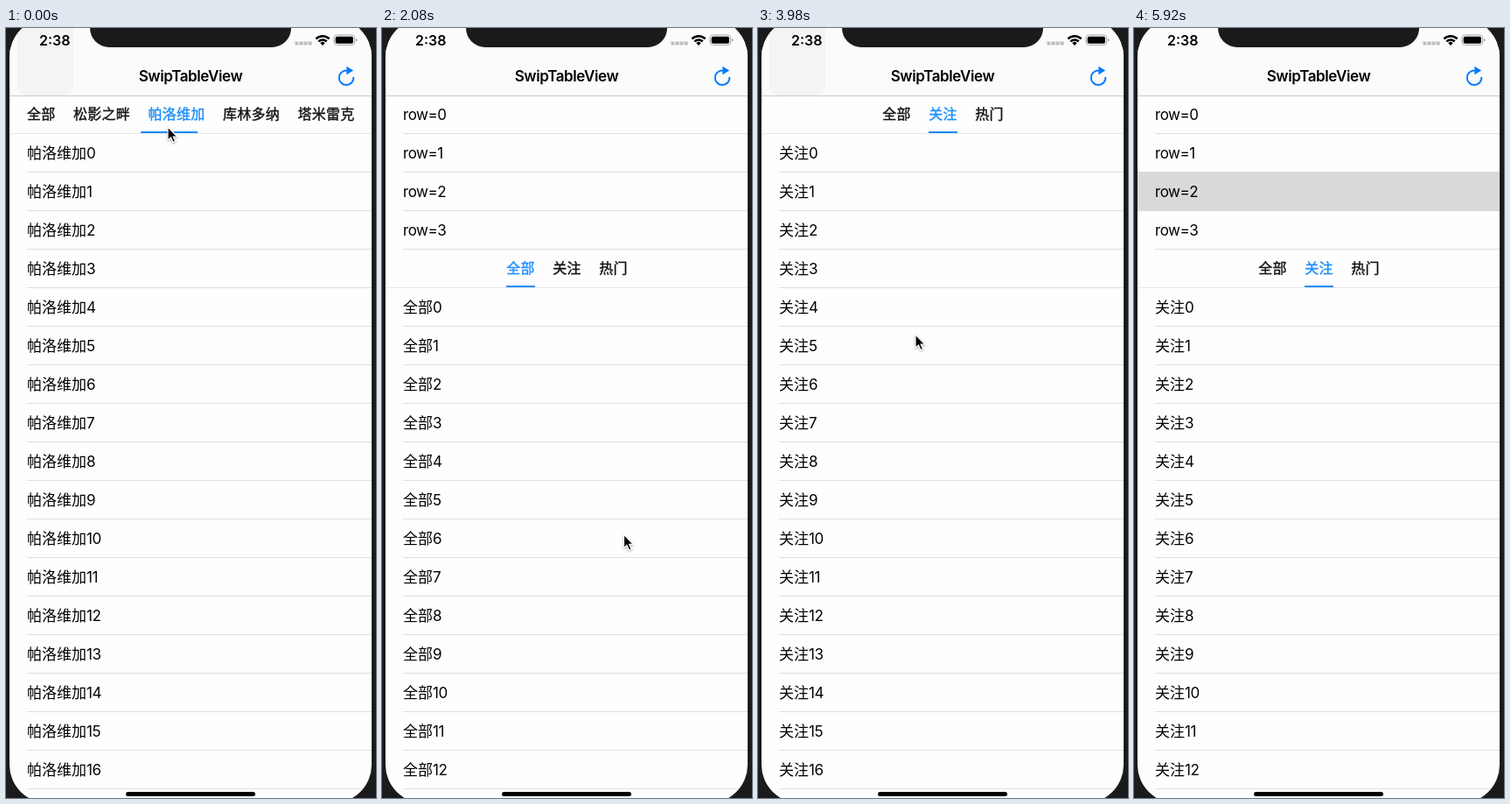
Write an HTML page that moves like this. It is 423 by 879 pixels and loops after 7.05 s.

```html
<!DOCTYPE html>
<html lang="zh-CN">
<head>
<meta charset="utf-8">
<title>SwipTableView</title>
<style>
html, body { margin: 0; width: 100%; height: 100%; overflow: hidden; background: #1b1a1c; }
body { font: 17px/44px Inter, "Noto Sans CJK SC", "Noto Sans CJK", sans-serif; color: #000; }
div, svg { position: absolute; }
#screen { left: 0; top: 0; width: 423px; height: 879px; background: #fefefe; overflow: hidden;
  clip-path: inset(-11px 5px -6px 4px round 44px); }
.page, #header { left: 4px; top: 0; width: 414px; }
.row { left: 20px; right: 0; height: 43px; border-bottom: 1px solid #dfdfe1; white-space: nowrap; }
.row span { letter-spacing: -.45px; }
.row.selected { background: #d9d9d9; border-color: #d9d9d9;
  box-shadow: -20px 0 #d9d9d9, 0 -1px #d9d9d9, -20px -1px #d9d9d9; }
.tabs { left: 4px; top: 0; width: 414px; height: 43px; border-bottom: 1px solid #e6e6e8; background: #fefefe;
  font-size: 16px; line-height: 43px; letter-spacing: .25px; color: #151515; -webkit-text-stroke: .4px; }
.tabs nav { position: absolute; display: flex; gap: 20.5px; white-space: nowrap; }
.tabs .active { color: #1e90ff; }
.underline { left: -4px; top: 41px; height: 2px; background: #1e8cff; }
#bar { left: 4px; top: 0; width: 414px; height: 77px; background: #fbfbfb; border-bottom: 1px solid #c9c9cb; }
#shade { left: 9px; top: -10px; width: 64px; height: 87px; background: #f4f4f4; border-radius: 10px; }
#title { left: 0; width: 414px; top: 33px; text-align: center; font-weight: 600; letter-spacing: -.4px; }
#clock { left: 34px; top: -8px; font-size: 16px; font-weight: 600; }
#thumb { left: 412.5px; top: 0; width: 2.5px; border-radius: 2px; background: #000; }
#cursor { left: 0; top: 0; overflow: visible; }
</style>
</head>
<body>
<div id="screen">
  <div id="header"></div>
  <div id="bar">
    <div id="shade"></div>
    <div id="clock">2:38</div>
    <div id="title">SwipTableView</div>
  </div>
  <svg width="423" height="879">
    <rect x="96" y="-40" width="230" height="62" rx="22" fill="#1b1a1c"/>
    <path d="M330.5 17.5h20" stroke="#bdbdbf" stroke-width="4" stroke-dasharray="4 1"/>
    <path d="M354.4 12.4a10.6 10.6 0 0 1 15.2 0M357.3 15.4a6.6 6.6 0 0 1 9.4 0"
      fill="none" stroke="#000" stroke-width="2.4"/>
    <path d="M359.3 17.2a3.8 3.8 0 0 1 5.4 0l-2.7 2.8z"/>
    <rect x="374.9" y="8" width="23.8" height="11.4" rx="3.4" fill="none" stroke="#a5a5a7"/>
    <rect x="376.6" y="9.7" width="20.4" height="8" rx="2"/>
    <path d="M400 11.8q1.6.5 1.6 2t-1.6 2z" fill="#a5a5a7"/>
    <g id="refresh" fill="#087aff">
      <path d="M389.5 48.5A8.3 8.3 0 1 0 397.3 56" fill="none" stroke="#087aff" stroke-width="2"/>
      <path d="M389.3 43.8L397.2 48.4L389.3 53.2z"/>
    </g>
    <rect x="137" y="872" width="148" height="5" rx="2.5"/>
  </svg>
  <div id="thumb"></div>
  <svg id="cursor" width="14" height="20">
    <path d="M0 0V15.2L3.5 12L6 17.6L8.6 16.5L6.2 11H10.8z" stroke="#fff" stroke-width="1.2"
      style="filter:drop-shadow(0 1px 1px #0005)"/>
  </svg>
</div>
<script>
const LOOP = 7050, STEP = 148, LAST = 40;
const NAV = 77, ROW = 44, HEADER = 4 * ROW, PAGE = 414;
const TAP = 10, SWIPE = 21, SWITCH = 25, SELECT = 37;
const $ = id => document.getElementById(id);

function add(parent, className, before = null) {
  const el = document.createElement('div');
  el.className = className;
  parent.insertBefore(el, before);
  return el;
}

function fillRows(parent, html, count) {
  return Array.from({ length: count }, (_, i) => {
    const row = add(parent, 'row');
    row.style.top = i * ROW + 'px';
    row.innerHTML = html(i);
    return row;
  });
}

function makePage(label, count) {
  const page = add($('screen'), 'page', $('header'));
  fillRows(page, i => `${label}<span>${i}</span>`, count);
  return page;
}

function makeTabs(labels, left) {
  const bar = add($('screen'), 'tabs', $('bar'));
  bar.innerHTML = `<nav style="left:${left - 4}px">${labels.map(s => `<span>${s}</span>`).join('')}</nav>`;
  const line = add(bar, 'underline');
  return { bar, line, items: [...bar.querySelectorAll('span')] };
}

const headerRows = fillRows($('header'), i => `<span>row=${i}</span>`, 4);
const region = makePage('帕洛维加', 20);
const all = makePage('全部', 40);
const follow = makePage('关注', 20);
const regionTabs = makeTabs(['全部', '松影之畔', '帕洛维加', '库林多纳', '塔米雷克'], 24);
const feedTabs = makeTabs(['全部', '关注', '热门'], 142.2);

const mix = (a, b, p) => a + (b - a) * p;
const ramp = (step, from, to) => Math.min(1, Math.max(0, (step - from) / (to - from)));
const easeOut = p => 1 - (1 - p) ** 2;
const smooth = p => p * p * (3 - 2 * p);

// Drags the stuck header open past its end, then lets it spring back.
function pullOpen(step, from, to, over) {
  return step <= to ? mix(HEADER, -over, ramp(step, from, to)) : Math.round(-over * .45 ** (step - to));
}

const regionScroll = step => pullOpen(step, 2, 5, 28);
const followScroll = step => pullOpen(step, 26, 30, 16);
const allScroll = step => 238 * ramp(step, 15, 18) + 106 * easeOut(ramp(step, 18, 21));

const shownDuring = (step, from, to) => Math.min(ramp(step, from - 1, from), 1 - ramp(step, to, to + 2));

// Places where the pointer pauses: step, x, y.
const stops = [
  [0, 185, 113], [5, 247, 365], [9, 378, 65], [11, 387, 57], [15, 256, 675], [18, 256, 437],
  [21, 350, 478], [23, 188, 480], [26, 180, 350], [30, 206, 569], [36, 196, 186]
];

function pointer(step) {
  const next = stops.findIndex(stop => stop[0] > step);
  if (next < 0) return stops[stops.length - 1].slice(1);
  const [from, x, y] = stops[next - 1], [to, x2, y2] = stops[next];
  const p = smooth(ramp(step, from, to));
  return [mix(x, x2, p), mix(y, y2, p)];
}

function move(el, x, y) {
  el.style.transform = `translate(${x}px, ${y}px)`;
}

function show(el, visible) {
  el.style.visibility = visible ? 'visible' : 'hidden';
}

function draw(step) {
  const feed = step > TAP, following = step >= SWITCH, longList = feed && step < SWITCH - 1;
  const scroll = (!feed ? regionScroll : longList ? allScroll : followScroll)(step);
  const swipe = PAGE * easeOut(ramp(step, SWIPE, SWIPE + 3.28));
  const listTop = offset => NAV + HEADER + ROW - offset;

  move(region, 0, listTop(regionScroll(step)));
  move(all, -swipe, listTop(allScroll(step)));
  move(follow, PAGE - swipe, listTop(followScroll(step)));
  show(region, !feed);
  show(all, feed);
  show(follow, feed);
  move($('header'), 0, NAV - scroll);
  headerRows[2].classList.toggle('selected', step >= SELECT);

  const tabs = feed ? feedTabs : regionTabs;
  const active = feed ? +following : 2;
  show(regionTabs.bar, !feed);
  show(feedTabs.bar, feed);
  move(tabs.bar, 0, Math.max(NAV, NAV + HEADER - scroll));
  tabs.items.forEach((item, i) => item.classList.toggle('active', i === active));
  tabs.line.style.width = feed ? '33px' : '65px';
  move(tabs.line, feed ? mix(142, 195, ramp(step, 24, 26)) : mix(154, 162, ramp(step, 0, 1)), 0);

  const thumb = $('thumb');
  thumb.style.height = (longList ? 263 : 624) + Math.min(0, scroll) + 'px';
  thumb.style.opacity = .42 * Math.max(
    shownDuring(step, 3, 9), shownDuring(step, 16, 20), shownDuring(step, 27, 34));
  move(thumb, 0, 80 + Math.max(0, scroll) * (longList ? .277 : .77));

  show($('shade'), scroll >= 150);
  $('refresh').style.opacity = step === TAP ? .3 : 1;
  move($('cursor'), ...pointer(step));
  show($('cursor'), step < LAST);
}

const start = performance.now();
function tick() {
  const time = (performance.now() - start) % LOOP;
  draw(Math.min(LAST, Math.floor((time + 12) / STEP)));
  requestAnimationFrame(tick);
}
tick();
</script>
</body>
</html>
```
